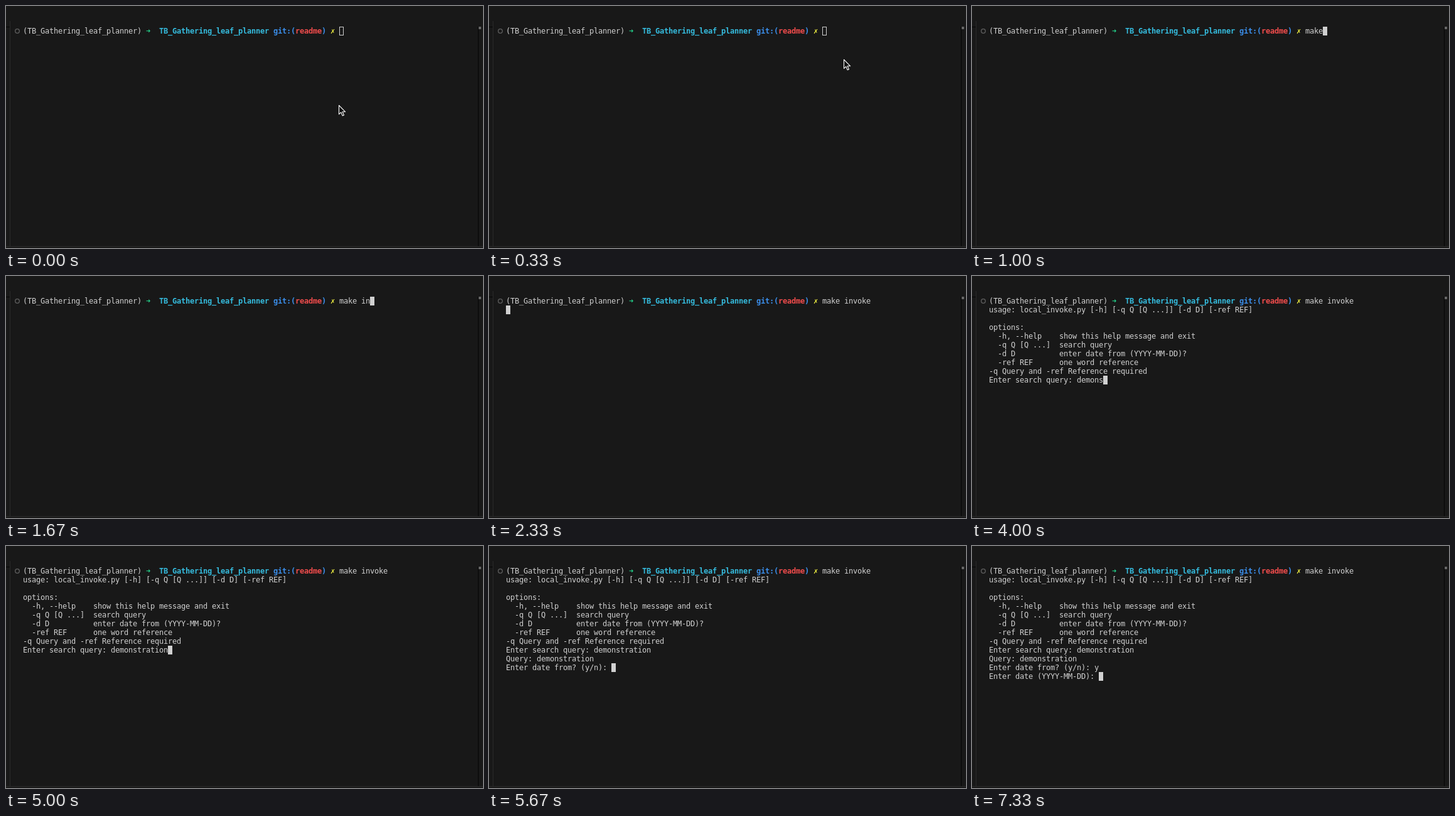
Write an HTML page that moves like this. It is 760 px wide and 386 px high and loops after 8000 ms.

```html
<!DOCTYPE html>
<html lang="en">
<head>
<meta charset="utf-8">
<title>Terminal session</title>
<style>
  html, body { margin: 0; width: 100%; height: 100%; overflow: hidden; background: #181818; }
  svg { display: block; }
  text { font: 12px "DejaVu Sans Mono", monospace; white-space: pre; }
  .bold { font-weight: bold; }
</style>
</head>
<body>
<svg id="stage" width="760" height="386" viewBox="0 0 760 386">
  <rect width="760" height="386" fill="#181818"/>
  <g shape-rendering="crispEdges">
    <rect x="6" y="24" width="1" height="359" fill="#2b2b2b"/>
    <rect x="0" y="33" width="6" height="1" fill="#050505"/>
    <rect x="752" y="33" width="1" height="350" fill="#050505"/>
    <rect x="0" y="383" width="760" height="1" fill="#2b2b2b"/>
    <rect x="753" y="33" width="4" height="4" fill="#666"/>
  </g>
  <circle cx="18" cy="40" r="3.3" fill="none" stroke="#606060" stroke-width="1.3"/>
  <g id="screen"></g>
  <rect id="caret"/>
  <path id="pointer" d="M.5 .5v14.2l3.3-3.1 2.4 5.4 2.3-1-2.4-5.2h4.6z"
        fill="#111" stroke="#fff" stroke-width="1.1" stroke-linejoin="round"/>
</svg>
<script>
const LOOP = 8000, LEFT = 27, TOP = 33, CELL = 7, ROW = 14;
const FG = "#d0d0d0";
const $ = id => document.getElementById(id);
const screen = $("screen"), caret = $("caret"), pointer = $("pointer");

function setAll(el, attrs) {
  for (const k in attrs) el.setAttribute(k, attrs[k]);
}

// Every glyph sits in its own terminal cell.
function write(el, row, col, str) {
  if (el.textContent === str) return;
  el.textContent = str;
  setAll(el, {
    x: [...str].map((_, i) => LEFT + (col + i) * CELL).join(" "),
    y: TOP + row * ROW + 11
  });
}

function addText(fill, bold) {
  const el = document.createElementNS("http://www.w3.org/2000/svg", "text");
  setAll(el, { fill, class: bold ? "bold" : "" });
  screen.append(el);
  return el;
}

const project = "TB_Gathering_leaf_planner";
let promptEnd = 0;
[
  ["(" + project + ") ", FG],
  ["➜  ", "#23d18b", true],
  [project + " ", "#35bbdd", true],
  ["git:(", "#3b8eea", true],
  ["readme", "#f14c4c", true],
  [") ", "#3b8eea", true],
  ["✗ ", "#f5f543", true]
].forEach(([str, fill, bold]) => {
  write(addText(fill, bold), 0, promptEnd, str);
  promptEnd += str.length;
});

const help = [
  "usage: local_invoke.py [-h] [-q Q [Q ...]] [-d D] [-ref REF]",
  "",
  "options:",
  "  -h, --help    show this help message and exit",
  "  -q Q [Q ...]  search query",
  "  -d D          enter date from (YYYY-MM-DD)?",
  "  -ref REF      one word reference",
  "-q Query and -ref Reference required"
];
const command = "make invoke", word = "demonstration";
const askQuery = "Enter search query: ";
const askFrom = "Enter date from? (y/n): ";
const askDate = "Enter date (YYYY-MM-DD): ";

const typing = n => [command.slice(0, n)];
const querying = n => [command, ...help, askQuery + word.slice(0, n)];
const answered = [...querying(word.length), "Query: " + word];

// Start time and the lines then on screen; the caret follows the last line.
const steps = [
  [0, typing(0)],
  [1000, typing(4)],
  [1330, typing(5)],
  [1670, typing(7)],
  [2000, typing(11)],
  [2330, [command, ""]],
  [2670, querying(0)],
  [3670, querying(2)],
  [4000, querying(6)],
  [4330, querying(11)],
  [4670, querying(13)],
  [5670, [...answered, askFrom]],
  [6670, [...answered, askFrom + "y"]],
  [7330, [...answered, askFrom + "y", askDate]]
];
const rows = Array.from({ length: 13 }, () => addText(FG));
const indent = row => row ? 0 : promptEnd;

function render(t) {
  const lines = steps.findLast(s => s[0] <= t)[1];
  rows.forEach((el, i) => write(el, i, indent(i), lines[i] || ""));

  const row = lines.length - 1;
  const x = LEFT + (indent(row) + lines[row].length) * CELL;
  const y = TOP + row * ROW;
  const focused = t >= 670;
  const inset = focused ? 0 : 0.5;
  setAll(caret, {
    x: x + inset, y: y + inset,
    width: CELL - 2 * inset, height: ROW - 2 * inset,
    fill: focused ? FG : "none",
    stroke: focused ? "none" : FG
  });

  setAll(pointer, {
    transform: t < 330 ? "translate(530 158)" : "translate(565 85)",
    visibility: t < 1000 ? "visible" : "hidden"
  });
}

function tick() {
  render(performance.now() % LOOP);
  requestAnimationFrame(tick);
}
tick();
</script>
</body>
</html>
```
